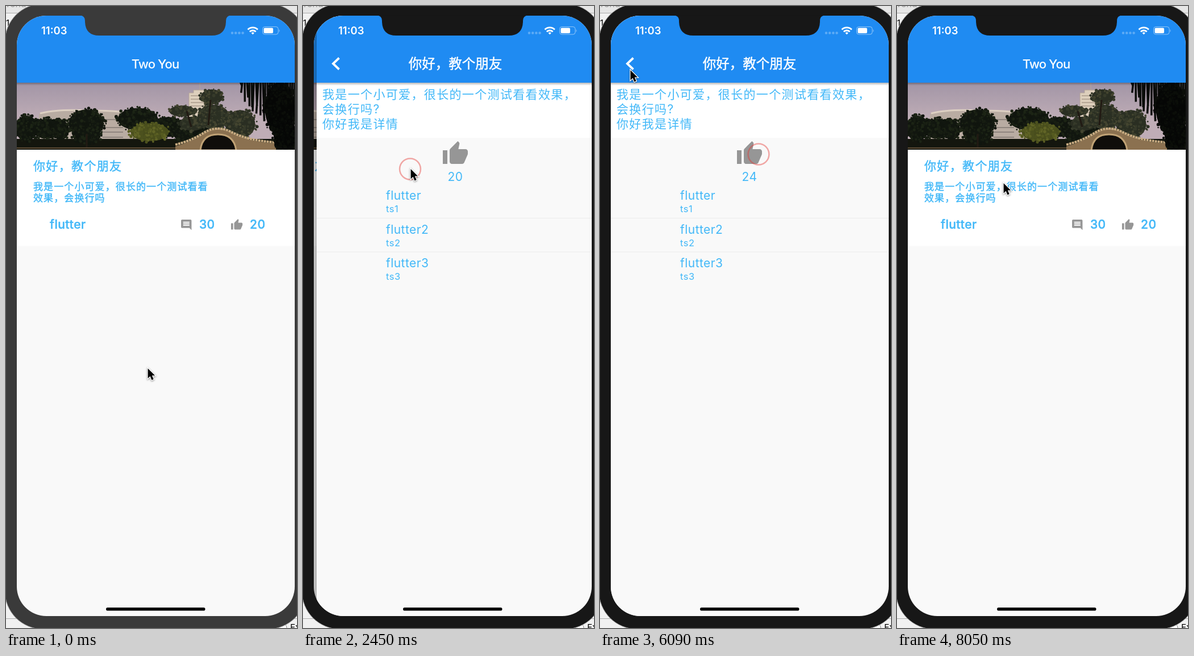
These frames come from a looping animation (512 px wide and 1095 px high, 8120 ms). An HTML page:

```html
<!DOCTYPE html>
<html lang="zh-CN">
<head>
<meta charset="utf-8">
<style>
html, body { margin: 0; width: 100%; height: 100%; overflow: hidden; }
svg { display: block; width: 512px; height: 1095px; }
text { font-family: Inter, "Noto Sans CJK SC", "Noto Sans CJK", sans-serif; white-space: pre; }
.blue { fill: #42b8f8; }
.bold { font-weight: 500; stroke: #42b8f8; stroke-width: .45px; }
.big { font-size: 21px; letter-spacing: 1.35px; }
.mid { font-size: 17px; letter-spacing: 1.1px; }
.lat { font-size: 21px; letter-spacing: .45px; }
.small { font-size: 16.5px; letter-spacing: .5px; }
.bar { font-size: 22px; font-weight: 500; fill: #fff; text-anchor: middle; }
.han { font-size: 23.5px; stroke: #fff; stroke-width: .5px; }
</style>
</head>
<body>
<svg viewBox="0 0 512 1095">
  <defs>
    <clipPath id="screen"><rect x="19" y="17" width="489" height="1057" rx="52"/></clipPath>
    <clipPath id="photoClip"><rect x="19" y="135" width="489" height="118"/></clipPath>
    <clipPath id="barClip"><rect x="19" y="17" width="489" height="118"/></clipPath>
    <linearGradient id="sky" x2="0" y2="1">
      <stop stop-color="#a295a6"/><stop offset=".55" stop-color="#bfadb6"/>
    </linearGradient>
    <linearGradient id="edge">
      <stop stop-opacity="0"/><stop offset=".6" stop-opacity=".09"/><stop offset="1" stop-opacity=".3"/>
    </linearGradient>
    <linearGradient id="drop" x2="0" y2="1">
      <stop stop-opacity=".28"/><stop offset="1" stop-opacity="0"/>
    </linearGradient>
    <path id="thumb" fill="#969696" d="M1 21h4V9H1v12zm22-11c0-1.1-.9-2-2-2h-6.31l.95-4.57.03-.32c0-.41-.17-.79-.44-1.06L14.17 1 7.59 7.59C7.22 7.95 7 8.45 7 9v10c0 1.1.9 2 2 2h9c.83 0 1.54-.5 1.84-1.22l3.02-7.05c.09-.23.14-.47.14-.73v-2z"/>
    <g id="appBar">
      <rect x="19" y="135" width="489" height="5" fill="url(#drop)"/>
      <rect x="19" y="17" width="489" height="118" fill="#1f8bf2"/>
    </g>
  </defs>

  <!-- desktop behind the phone -->
  <rect width="512" height="1095" fill="#f1f1f1"/>
  <rect width="512" height="12" fill="#e6e6e6"/>
  <path d="M0 12.5H512M0 1078.5H512" stroke="#aaa"/>
  <text x="-2" y="2" font-size="16" fill="#999">Tend</text>
  <text x="0" y="35" font-size="15">1</text>
  <circle cx="486" cy="1095" r="8" fill="#fff" stroke="#888"/>
  <text x="500" y="1099" font-size="15">Ex</text>

  <rect id="bezel" x="-2" y="-4" width="530" height="1101" rx="67" stroke="#a5a5a5"/>

  <g clip-path="url(#screen)">
    <g id="list">
      <rect x="19" y="17" width="489" height="1057" fill="#f9f9f9"/>
      <rect x="19" y="253" width="489" height="169.5" fill="#fff"/>
      <g id="photo" clip-path="url(#photoClip)"></g>
      <use href="#appBar"/>
      <text class="bar" x="262.5" y="110" style="letter-spacing:-.9px">Two You</text>
      <text class="blue bold big" x="48" y="289.3">你好，教个朋友</text>
      <text class="blue bold mid" x="48" y="323.5">我是一个小可爱，很长的一个测试看看</text>
      <text class="blue bold mid" x="48" y="343.5">效果，会换行吗</text>
      <text class="blue bold lat" x="77" y="392">flutter</text>
      <path transform="translate(306.2 374.2) scale(.92)" fill="#969696" d="M21.99 4c0-1.1-.89-2-1.99-2H4c-1.1 0-2 .9-2 2v12c0 1.1.9 2 2 2h14l4 4-.01-18zM18 14H6v-2h12v2zm0-3H6V9h12v2zm0-3H6V6h12v2z"/>
      <text class="blue bold lat" x="340" y="392">30</text>
      <use href="#thumb" transform="translate(395 374.2) scale(.92)"/>
      <text class="blue bold lat" x="429" y="392">20</text>
    </g>

    <g id="detail">
      <rect x="-5" y="17" width="24" height="1057" fill="url(#edge)"/>
      <rect x="19" y="17" width="489" height="1057" fill="#f9f9f9"/>
      <rect x="19" y="135" width="489" height="97" fill="#fff"/>
      <use href="#appBar"/>
      <circle id="splash" cx="52" cy="101" r="40" fill="#fff" opacity=".07" clip-path="url(#barClip)"/>
      <path d="M58.5 91.5L48 101.5 58.5 111.5" fill="none" stroke="#fff" stroke-width="3.8"/>
      <text class="bar han" x="263" y="110">你好，教个朋友</text>
      <text class="blue big" x="29" y="163">我是一个小可爱，很长的一个测试看看效果，</text>
      <text class="blue big" x="29" y="189">会换行吗?</text>
      <text class="blue big" x="29" y="215">你好我是详情</text>
      <use href="#thumb" transform="translate(239 236) scale(2)"/>
      <text id="count" class="blue lat" x="263" y="308" text-anchor="middle"></text>
      <g id="replies"></g>
    </g>

    <!-- status bar -->
    <text x="62" y="50" font-size="18.5" font-weight="600" fill="#fff">11:03</text>
    <path d="M398 47.5h19" stroke="#fff" stroke-opacity=".28" stroke-width="4.6" stroke-linecap="round" stroke-dasharray="0 6.2"/>
    <g fill="none" stroke="#fff" stroke-width="2.8">
      <path d="M425.5 41.5a12.4 12.4 0 0 1 17.4 0M428.8 45.2a7.7 7.7 0 0 1 10.8 0"/>
      <path d="M434.2 50.2l-2.6-2.8a3.8 3.8 0 0 1 5.2 0z" fill="#fff" stroke="none"/>
    </g>
    <rect x="451.5" y="36.5" width="27.5" height="13.5" rx="4" fill="none" stroke="#fff" stroke-opacity=".5"/>
    <rect x="453.5" y="38.5" width="16.5" height="9.5" rx="2" fill="#fff"/>
    <path d="M480.5 41v5q2-2.5 0-5z" fill="#fff" opacity=".5"/>
    <rect x="176" y="1059" width="174.5" height="5.6" rx="2.8"/>
  </g>

  <path id="notch" d="M130 16.5Q139 17 139 26V28Q140 52 164 52H362Q386 52 387 28V26Q387 17 396 16.5Z"/>
  <g id="rings"></g>
  <g id="cursor">
    <path transform="translate(.6 1) scale(.94)" d="M0 0V18.5L4.3 14.6 7.3 21.8 10.7 20.3 7.7 13.3H13.3Z" stroke="#fff" stroke-width="2.6" paint-order="stroke" style="filter:drop-shadow(0 1.5px 1.5px #0007)"/>
  </g>
</svg>

<script>
const LOOP = 8120, STEP = 70, WIDTH = 489;
const PUSH = 2120, POP = 6710, SLIDE = 400;
const $ = id => document.getElementById(id);

// Release time and place of each click
const clicks = [
  [PUSH, 188.5, 287], [3790, 282, 262], [4440, 282, 261],
  [5100, 280, 261], [5760, 279, 261], [POP, 51.5, 107.5]
];
// Pointer stops: time, x, y
const stops = [
  [0, 249, 637], [1190, 216, 276], [1800, 189, 286], [2520, 189, 286],
  [3640, 282, 261], [4440, 282, 261], [5760, 279, 261], [6090, 53, 112],
  [6400, 51, 107], [6720, 51, 107], [6930, 81, 106], [8050, 187, 311]
];

let seed = 7;
const random = () => (seed = seed * 16807 % 2147483647) / 2147483647;

// A tree crown: a solid core with small leaves scattered over and around it
function foliage(cx, cy, rx, ry, [core, ...leaves]) {
  let out = `<ellipse cx="${cx}" cy="${cy}" rx="${rx * .88}" ry="${ry * .88}" fill="${core}"/>`;
  for (let i = 0; i < rx * ry / 5; i++) {
    const a = random() * 6.283, d = Math.sqrt(random());
    out += `<circle cx="${cx + Math.cos(a) * d * rx}" cy="${cy + Math.sin(a) * d * ry}" r="${1 + random() * 2}" fill="${leaves[i % leaves.length]}"/>`;
  }
  return out;
}

function buildPhoto() {
  const dark = ['#11160f', '#171d12', '#1c2415', '#10150e'];
  const olive = ['#2a2e22', '#363a2a', '#2b3023', '#43442f'];
  const lime = ['#484d1c', '#555a20', '#4c511e', '#606426'];
  const black = ['#050605', '#070907', '#0b0e09'];
  let strands = '';
  for (let x = 412; x < 510; x += 4) {
    const len = 8 + (x - 412) * .9 + random() * 28;
    strands += `M${x} 133l${random() * 8 - 4} ${len}`;
  }
  let windows = '';
  for (let y = 158; y < 190; y += 6) windows += `M325 ${y}h29`;
  return `<rect x="19" y="135" width="489" height="118" fill="url(#sky)"/>
    <path d="M58 190Q90 180 150 183Q205 183 226 191V248H58Z" fill="#b9aca2"/>
    <path d="M60 189Q90 181 150 184Q205 184 226 191" fill="none" stroke="#ddd0c2" stroke-width="3"/>
    <path d="M75 200H216M170 214h36M170 222h36M170 231h36" stroke="#8f857e" stroke-width="2"/>
    <path d="M322 153h8v-5h20v5h6v45h-34zM341 148v-13" fill="#ddcfbc" stroke="#b5a598"/>
    <path d="${windows}" stroke="#ab9b8b" stroke-width="1.5"/>
    <path d="M19 234H508V254H19Z" fill="#14160e"/>` +
    foliage(36, 215, 23, 25, dark) + foliage(72, 216, 28, 20, dark) +
    foliage(96, 218, 17, 20, dark) + foliage(141, 207, 35, 28, dark) +
    foliage(142, 228, 28, 15, dark) +
    foliage(232, 199, 40, 22, dark) + foliage(285, 213, 32, 20, dark) +
    foliage(330, 226, 40, 18, dark) +
    foliage(310, 185, 26, 11, olive) + foliage(362, 160, 22, 15, olive) +
    foliage(365, 195, 32, 24, olive) + foliage(412, 208, 30, 28, olive) +
    foliage(328, 207, 26, 14, olive) +
    foliage(253, 222, 38, 18, lime) +
    `<path d="M142 225v24M360 165l-4 45M318 185l8 28" stroke="#211a13" stroke-width="3"/>
    <path d="M298 247Q325 240 350 223Q372 211 395 222Q425 239 475 242V254H298Z" fill="#8b7150"/>
    <path d="M298 244Q325 238 350 222Q372 210 395 221Q425 237 475 240" fill="none" stroke="#c9ac82" stroke-width="4" stroke-dasharray="4 1"/>
    <path d="M342 254Q345 226 373 226Q401 226 405 254Z" fill="#0f0d0a" stroke="#c0a275" stroke-width="3"/>
    <path d="M19 250H298" stroke="#5d4b35" stroke-width="2"/>
    <path d="${strands}" stroke="#0a0c09" stroke-width="3.5"/>` +
    foliage(482, 180, 30, 52, black) + foliage(492, 228, 24, 28, black);
}

function bezier(t, x1, y1, x2, y2) {
  const at = (s, a, b) => 3 * (1 - s) ** 2 * s * a + 3 * (1 - s) * s * s * b + s ** 3;
  let lo = 0, hi = 1;
  for (let i = 0; i < 20; i++) {
    const mid = (lo + hi) / 2;
    if (at(mid, x1, x2) < t) lo = mid; else hi = mid;
  }
  return at(hi, y1, y2);
}

const clamp = v => Math.max(0, Math.min(1, v));

// How far the detail page covers the list, 0 to 1
function coverage(t) {
  if (t < POP) return t <= PUSH ? 0 : bezier(clamp((t - PUSH) / SLIDE), .35, .91, .33, .97);
  return t >= POP + SLIDE ? 0 : bezier(1 - (t - POP) / SLIDE, .67, .03, .65, .09);
}

function pointer(t) {
  const i = Math.max(1, stops.findIndex(s => s[0] >= t));
  const [t0, x0, y0] = stops[i - 1], [t1, x1, y1] = stops[i];
  const p = clamp((t - t0) / (t1 - t0)), e = p * p * (3 - 2 * p);
  return `translate(${x0 + (x1 - x0) * e} ${y0 + (y1 - y0) * e})`;
}

function ring([time, x, y], t) {
  const age = t - time;
  if (age < -100 || age > 500) return '';
  return `<circle cx="${x}" cy="${y}" r="${12.5 + age * .018}" fill="none" stroke="#e3342f" stroke-width="2.5" opacity="${clamp(1 - (age - 180) / 300) * .85}"/>`;
}

function draw(now) {
  const t = Math.floor(now % LOOP / STEP) * STEP;
  const cover = coverage(t);
  $('list').setAttribute('transform', `translate(${-cover * WIDTH / 3} 0)`);
  $('detail').setAttribute('transform', `translate(${(1 - cover) * WIDTH} 0)`);
  $('detail').setAttribute('visibility', cover ? 'visible' : 'hidden');
  $('splash').setAttribute('opacity', t > POP - 60 ? .07 : 0);
  $('count').textContent = 20 + clicks.slice(1, 5).filter(c => t >= c[0]).length;
  // The window gains focus with the first press
  const color = t >= PUSH - 90 ? '#171717' : '#3a3a3a';
  $('bezel').setAttribute('fill', color);
  $('notch').setAttribute('fill', color);
  $('rings').innerHTML = clicks.map(c => ring(c, t)).join('');
  $('cursor').setAttribute('transform', pointer(t));
  requestAnimationFrame(draw);
}

$('photo').innerHTML = buildPhoto();
$('replies').innerHTML = ['', 2, 3].map((n, i) => {
  const y = i * 59.5;
  return `<text class="blue lat" x="141" y="${341 + y}">flutter${n}</text>
    <text class="blue small" x="141" y="${363 + y}">ts${i + 1}</text>` +
    (i < 2 ? `<path d="M19 ${373.5 + y}H508" stroke="#ebebeb"/>` : '');
}).join('');
requestAnimationFrame(draw);
</script>
</body>
</html>
```
